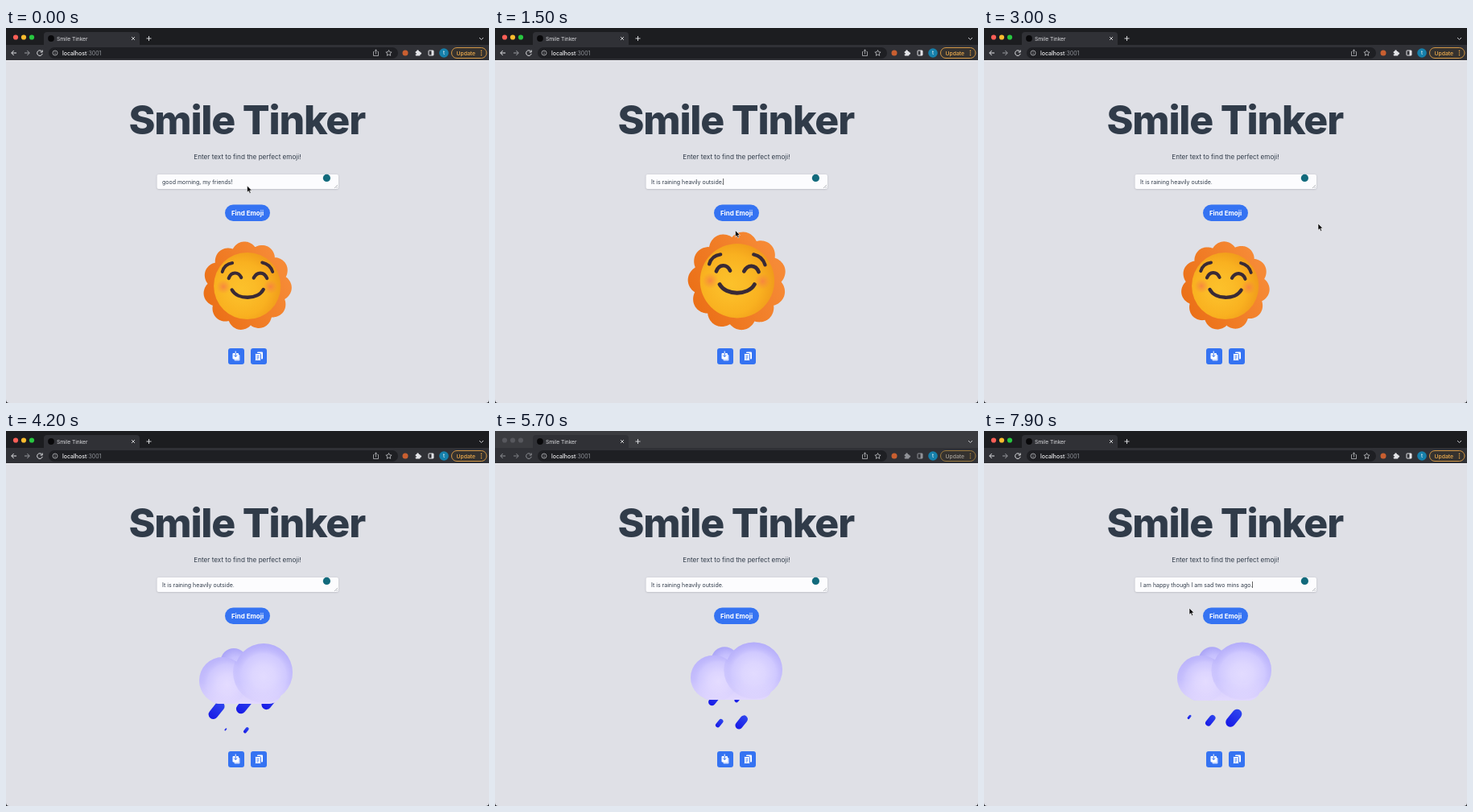
An HTML page with a canvas that plays this animation: 600x466 px, repeating every 8 s.

```html
<!DOCTYPE html>
<html lang="en">
<head>
<meta charset="utf-8">
<title>Smile Tinker</title>
<style>
html, body { margin: 0; width: 100%; height: 100%; overflow: hidden; background: #dfe0e6; }
canvas, svg { position: absolute; left: 0; top: 0; width: 600px; height: 466px; }
text { font-family: Inter, "Open Sans", sans-serif; fill: #303b49; white-space: pre; }
</style>
</head>
<body>
<canvas id="stage"></canvas>
<svg viewBox="0 0 600 466">
  <text x="63" y="15.5" font-size="6.6" style="fill:#dedfe2">Smile Tinker</text>
  <text x="70" y="33.5" font-size="7" style="fill:#f2f2f4" font-weight="500">localhost<tspan fill="#92959b" font-weight="400">:3001</tspan></text>
  <text x="544" y="33.4" font-size="6.5" text-anchor="middle" style="fill:#fff">t</text>
  <text id="update" x="559.5" y="33.6" font-size="6.8" font-weight="500">Update</text>
  <text x="299.2" y="132" font-size="50" font-weight="800" letter-spacing="-1.2" text-anchor="middle">Smile Tinker</text>
  <text x="300" y="163" font-size="8.14" text-anchor="middle">Enter text to find the perfect emoji!</text>
  <text id="field" x="194" y="193.6" font-size="7"></text>
  <rect id="caret" y="187" width="0.7" height="8" fill="#222"/>
  <text x="300" y="232.7" font-size="8" font-weight="700" text-anchor="middle" style="fill:#fff">Find Emoji</text>
  <path id="pointer" d="M0 0V8.2L1.9 6.5L3.2 9.4L4.7 8.7L3.4 5.9H6Z" fill="#08080a" stroke="#fff" stroke-width="0.6"/>
</svg>
<script>
const LOOP = 8000, W = 600, H = 466, TAU = Math.PI * 2;
const RAIN_AT = 3500, BLUR_AT = 4400, FOCUS_AT = 7000;
const $ = id => document.getElementById(id);
const canvas = $('stage'), c = canvas.getContext('2d');
const dpr = window.devicePixelRatio || 1;
canvas.width = W * dpr;
canvas.height = H * dpr;

const clamp = v => Math.max(0, Math.min(1, v));
const smooth = u => u * u * (3 - 2 * u);
const linear = u => u;

// Each key is [time, ...values]; the end segments extend when easing is linear.
function track(keys, t, ease = smooth) {
  let i = 0;
  while (i < keys.length - 2 && t > keys[i + 1][0]) i++;
  const a = keys[i], b = keys[i + 1];
  const u = (t - a[0]) / (b[0] - a[0]);
  const k = ease === linear ? u : ease(clamp(u));
  return a.slice(1).map((v, n) => v + (b[n + 1] - v) * k);
}

function box(x, y, w, h, r, fill, stroke) {
  c.beginPath();
  c.roundRect(x, y, w, h, r);
  if (fill) { c.fillStyle = fill; c.fill(); }
  if (stroke) { c.strokeStyle = stroke; c.stroke(); }
}
function disc(x, y, r, fill) {
  c.beginPath();
  c.arc(x, y, r, 0, TAU);
  c.fillStyle = fill;
  c.fill();
}
function line(d, color, width = 1) {
  c.strokeStyle = color;
  c.lineWidth = width;
  c.stroke(new Path2D(d));
}
function radial(x, y, r, ...stops) {
  const g = c.createRadialGradient(x, y, 0, x, y, r);
  stops.forEach((s, i) => g.addColorStop(i / (stops.length - 1), s));
  return g;
}
function slope(x0, y0, x1, y1, a, b) {
  const g = c.createLinearGradient(x0, y0, x1, y1);
  g.addColorStop(0, a);
  g.addColorStop(1, b);
  return g;
}

function drawChrome(focused) {
  const icon = focused ? '#e3e4e7' : '#909297';
  const bar = '#303136';
  c.fillStyle = focused ? '#1c1d20' : '#3b3c40';
  c.fillRect(0, 0, W, 22);
  c.fillStyle = bar;
  c.fillRect(0, 21, W, 19);
  box(47, 5, 119, 20, 4, bar);
  const lights = focused ? ['#fe5f57', '#febc2e', '#28c840'] : Array(3).fill('#57585d');
  lights.forEach((color, i) => disc(12 + i * 10, 11.5, 3.1, color));
  disc(56, 13, 3.9, '#08080a');
  line('M156 11l4 4M160 11l-4 4', '#d6d7da', 0.9);
  line('M177.5 10v6M174.5 13h6', '#d6d7da', 1);
  line('M588 12l2.5 2.5L593 12', '#c9cace', 1);

  line('M13 31H7M9.7 28L6.7 31l3 3', icon, 1);
  line('M23 31h6M26.3 28l3 3l-3 3', focused ? '#999ba0' : '#808287', 1);
  line('M44.5 29A3.3 3.3 0 1 0 45.2 31.8M45.2 27.5V30H42.7', icon, 1);
  box(53, 24, 434, 14, 7, '#1e1f23');
  line('M64 31A3 3 0 1 1 58 31A3 3 0 1 1 64 31M61 30.5v2.2M61 29v.7', '#b9babe', 0.8);
  line('M457.5 29.5H456.5V34.5H462.5V29.5H461.5M459.5 32.5V27M457.8 28.6L459.5 27L461.2 28.6', '#b9babe', 0.8);
  line('M475.5 27.5l1.1 2.3 2.5.3-1.9 1.7.5 2.5-2.2-1.3-2.2 1.3.5-2.5-1.9-1.7 2.5-.3Z', '#c3c4c8', 0.8);

  disc(496, 31, 3.5, '#c95f30');
  box(508.7, 29, 5.8, 5.6, 0.8, icon);
  disc(511.5, 28.7, 1.5, icon);
  disc(514.7, 31.6, 1.4, icon);
  disc(509, 31.8, 0.9, bar);
  c.lineWidth = 1;
  box(525, 28, 6, 6, 0.6, null, icon);
  c.fillStyle = icon;
  c.fillRect(528.5, 28, 2.5, 6);
  disc(544, 31, 5.8, '#1680ab');
  c.lineWidth = 0.9;
  const amber = focused ? '#e5a247' : '#a5803f';
  box(553.5, 24.5, 43.5, 13, 6.5, '#35322f', amber);
  [28.4, 31, 33.6].forEach(y => disc(590.5, y, 0.8, amber));
}

function drawPage() {
  c.fillStyle = '#dfe0e6';
  c.fillRect(0, 40, W, H - 40);
  c.fillStyle = '#ececf0';
  c.fillRect(0, 40, W, 1);
  c.save();
  c.shadowColor = 'rgba(40,45,60,.25)';
  c.shadowBlur = 2 * dpr;
  c.shadowOffsetY = 0.6 * dpr;
  box(187.5, 182, 225.5, 18, 2, '#fcfcfe');
  c.restore();
  line('M408 199l4-4M410.3 199l1.7-1.7', '#888b92', 0.6);
  disc(398.4, 186.4, 4.6, '#126a7c');
  box(272, 219.5, 56, 20.5, 10.25, '#3573f2');

  [276, 304].forEach(x => box(x, 398, 20, 20, 3, '#3573f2'));
  box(283.5, 406, 7, 7.5, 1, '#cfdcff');
  box(281.5, 404, 7.5, 7.5, 1, '#fff');
  line('M285.2 401.5v7M283.2 406.5l2 2l2-2', '#3573f2', 1);
  line('M285.2 401.5v2.5', '#fff', 1);
  box(312, 402.5, 7, 9, 1, '#fff');
  box(309.5, 404.5, 7, 9, 1, '#fff', '#3573f2');
  line('M311.3 407.5h3.4M311.3 409.3h3.4M311.3 411.1h2.4', '#3573f2', 0.8);
}

const LOBES = 11;

function drawSun(t) {
  const k = (1 - Math.cos(TAU * t / 3000)) / 2;
  const s = 1 + 0.11 * k;
  c.save();
  c.translate(299.7 + 1.2 * k, 320.5 - 6.3 * k);
  c.scale(s, s);

  const spin = (-95 + 13 * k + t / 1000) * TAU / 360;
  c.beginPath();
  for (let i = 0; i <= 360; i++) {
    const a = i / 360 * TAU;
    const r = 49 + 6.2 * Math.abs(Math.cos(LOBES / 2 * (a - spin))) ** 0.8;
    c.lineTo(r * Math.cos(a), r * Math.sin(a));
  }
  c.fillStyle = slope(-45, 30, 45, -15, '#eb7017', '#f68a36');
  c.fill();
  disc(0, 0, 41.6, radial(-7, 4, 50, '#fcc12b', '#fbbb27', '#f9b120', '#f09a1a'));
  c.rotate(0.01 * t / 1000);
  c.translate(-0.6 * k, -1 - 0.8 * k);
  [-29.5, 29].forEach(x => disc(x, 2, 9, radial(x, 2, 9, 'rgba(247,125,70,.8)', 'rgba(247,135,60,0)')));
  c.lineCap = 'round';
  const ink = '#392a36';
  line('M-31 -16.5Q-28.5 -26 -18.5 -27.5M18.5 -28Q28.5 -26 31.5 -16.5', ink, 3.9);
  line('M-23 -8.5C-20 -17 -11 -17 -7.5 -9.5M8 -9C12 -17 21 -17 24.5 -8.5', ink, 4.2);
  line('M-19 6C-12 18.5 13 18.5 20 5.5', ink, 4.4);
  c.restore();
}

// Lanes run from x, y along (dx, dy); drops shrink to nothing at `end`.
const GAP = 0.68;
const lanes = [
  { x: 334, y: 327, dx: -43, dy: 54, end: 0.97, fade: 0.42, keys: [[4200, 0.22], [5700, 0.95], [6900, 1.36], [7900, 1.81]] },
  { x: 303, y: 331, dx: -34, dy: 45, end: 0.96, fade: 0.52, keys: [[4200, 0.3], [5700, 1.05], [6900, 1.4], [7900, 1.94]] },
  { x: 275, y: 330, dx: -29, dy: 37, end: 0.76, fade: 0.3, keys: [[4200, 0.68], [5700, 1.12], [6900, 1.82], [7900, 2.01]] }
];
const cloudBox = [
  [4200, 240, 356, 264, 339], [5700, 243, 357, 262.5, 334],
  [6900, 241.5, 355, 264, 339], [7900, 240, 357, 262.5, 335]
];

function drawDrop(lane, p) {
  const s = Math.min(clamp(p / 0.15 + 0.2), clamp((lane.end - p) / lane.fade));
  if (!s) return;
  c.save();
  c.translate(lane.x + lane.dx * p, lane.y + lane.dy * p);
  c.rotate(0.68);
  c.scale(s, s);
  box(-6, -12.5, 12, 25, 6, slope(0, -13, 0, 13, '#3048ee', '#1718e6'));
  c.restore();
}

function drawCloud(t) {
  for (const lane of lanes) {
    const phase = track(lane.keys, t, linear)[0];
    const p = (phase - Math.floor(phase)) * GAP;
    drawDrop(lane, p);
    drawDrop(lane, p + GAP);
  }
  const [x0, x1, y0, y1] = track(cloudBox, t);
  c.save();
  c.translate(x0, y0);
  c.scale((x1 - x0) / 116, (y1 - y0) / 75);
  c.translate(-240, -264);
  disc(283, 286.5, 16.5, radial(286, 291, 21, '#d2ccff', '#c6c0fe', '#aca6f7'));
  c.beginPath();
  c.arc(269, 310, 29, 0, TAU);
  c.moveTo(356, 300);
  c.arc(320, 300, 36, 0, TAU);
  c.roundRect(250, 306, 92, 33, 15);
  c.clip();
  c.fillStyle = slope(0, 264, 0, 339, '#b4adfa', '#d8d0fe');
  c.fillRect(236, 260, 124, 84);
  disc(269, 310, 32, radial(275, 315, 38, '#e4dcff', '#ddd5ff', '#cec7fe', 'rgba(178,171,250,.2)'));
  disc(320, 300, 38, radial(320, 305, 42, '#e2dbff', '#ddd6ff', '#d0c9ff', 'rgba(178,171,250,.2)'));
  c.fillStyle = slope(0, 312, 0, 339, 'rgba(230,220,254,0)', 'rgba(230,220,254,.7)');
  c.fillRect(236, 312, 124, 28);
  c.restore();
}

const lines = ['good morning, my friends!', 'It is raining heavily outside.', 'I am happy though I am sad two mins ago.'];
const typed = (s, t, from, to) => s.slice(0, Math.ceil(s.length * clamp((t - from) / (to - from))));

function setField(t) {
  let s = lines[1];
  if (t < 350) s = lines[0];
  else if (t < 1450) s = typed(lines[1], t, 350, 1450);
  else if (t >= 7050) s = typed(lines[2], t, 7050, 7850);
  const field = $('field'), caret = $('caret');
  field.textContent = s;
  const active = (t >= 350 && t < 2100) || t >= 7050;
  caret.style.display = active ? '' : 'none';
  if (active) caret.setAttribute('x', 193.6 + (s ? field.getComputedTextLength() : 0));
}

const pathOut = [[0, 299.5, 196], [400, 299.5, 196], [1300, 298.5, 251.5], [1700, 298.5, 251.5], [2200, 300, 231], [2500, 300, 231], [2950, 415, 243], [3400, 415, 243], [4100, 612, 290]];
const pathBack = [[6300, 612, 260], [6850, 330.5, 184], [7100, 330.5, 184], [7700, 255, 220], [8000, 255, 220]];

function render(t) {
  const focused = t < BLUR_AT || t >= FOCUS_AT;
  c.setTransform(dpr, 0, 0, dpr, 0, 0);
  c.lineCap = 'butt';
  drawPage();
  drawChrome(focused);
  if (t < RAIN_AT) drawSun(t); else drawCloud(t);
  c.fillStyle = '#25262a';
  c.fill(new Path2D('M0 462Q0 466 4 466H0ZM600 462Q600 466 596 466H600Z'));
  $('update').style.fill = focused ? '#f0ad4d' : '#a6a19a';
  setField(t);
  const [x, y] = track(t < 5000 ? pathOut : pathBack, t);
  $('pointer').setAttribute('transform', `translate(${x} ${y})`);
}

function tick(now) {
  render(now % LOOP);
  requestAnimationFrame(tick);
}
requestAnimationFrame(tick);
</script>
</body>
</html>
```
